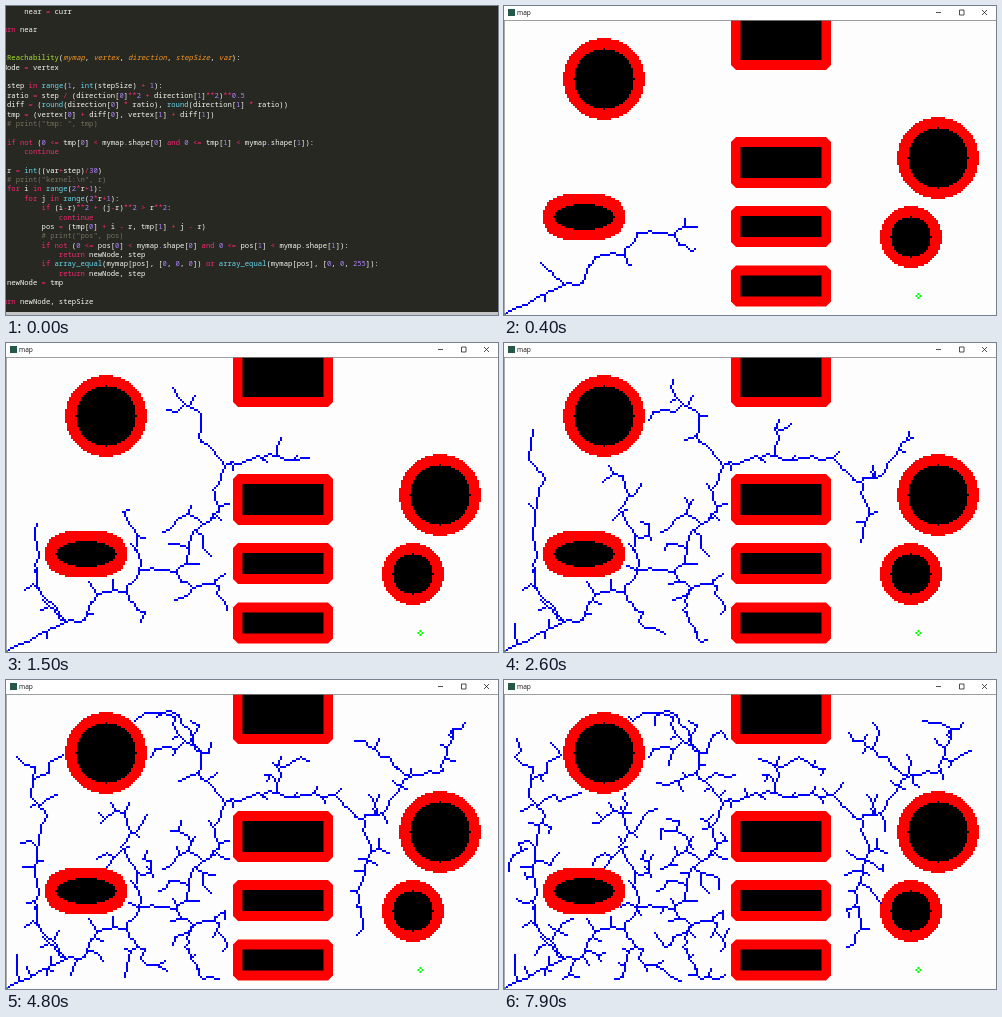
Recreate the animation shown at these times as an HTML page with a canvas. Size 492 px wide and 309 px high, loop 8 s.

```html
<!DOCTYPE html>
<html>
<head>
<meta charset="utf-8">
<style>
html, body { margin: 0; width: 100%; height: 100%; overflow: hidden; background: #272822; }
pre { position: absolute; left: -33.6px; top: .6px; margin: 0; color: #f8f8f2;
  font: 7.21px/9.355px "Noto Sans Mono", monospace; }
.comment { color: #75715e; }
.param { color: #fd971f; font-style: italic; }
.name { color: #a6e22e; }
.key { color: #f92672; }
.call { color: #66d9ef; }
.num { color: #ae81ff; }
#bar { position: absolute; left: 0; top: 306px; width: 492px; height: 3px; background: #c4c4c4; }
#win { position: absolute; left: 0; top: 0; width: 492px; height: 309px; transform-origin: 0 0; }
#win canvas { position: absolute; left: 0; top: 0; }
#win span { position: absolute; left: 13px; top: 2px; font: 6.6px/10px "Open sans", "Open Sans", sans-serif; color: #111; }
</style>
</head>
<body>
<pre id="code"></pre>
<div id="bar"></div>
<div id="win"><canvas id="map" width="492" height="309"></canvas><span>map</span></div>
<script>
const source = String.raw`            near = curr

    return near


def testReachability(mymap, vertex, direction, stepSize, var):
    newNode = vertex

    for step in range(1, int(stepSize) + 1):
        ratio = step / (direction[0]**2 + direction[1]**2)**0.5
        diff = (round(direction[0] * ratio), round(direction[1] * ratio))
        tmp = (vertex[0] + diff[0], vertex[1] + diff[1])
        # print("tmp: ", tmp)

        if not (0 <= tmp[0] < mymap.shape[0] and 0 <= tmp[1] < mymap.shape[1]):
            continue

        r = int((var+step)/30)
        # print("kernel:\n", r)
        for i in range(2*r+1):
            for j in range(2*r+1):
                if (i-r)**2 + (j-r)**2 > r**2:
                    continue
                pos = (tmp[0] + i - r, tmp[1] + j - r)
                # print("pos", pos)
                if not (0 <= pos[0] < mymap.shape[0] and 0 <= pos[1] < mymap.shape[1]):
                    return newNode, step
                if array_equal(mymap[pos], [0, 0, 0]) or array_equal(mymap[pos], [0, 0, 255]):
                    return newNode, step
        newNode = tmp

    return newNode, stepSize`;

const tokens = /(?<comment>#.*)|(?<param>(?<=^def .*[(, ])\w+(?=[,)]))|(?<name>testReachability)|(?<key>\b(?:def|for|in|if|not|and|or|return|continue)\b|[-<>=+*\/]+)|(?<call>\b(?:range|int|round|array_equal)\b)|(?<num>\b[\d.]+)/gm;
document.getElementById('code').innerHTML = source.replace(tokens, (text, ...rest) => {
  const kind = Object.entries(rest.at(-1)).find(([, match]) => match)[0];
  return `<span class="${kind}">${text.replace(/</g, '&lt;').replace(/>/g, '&gt;')}</span>`;
});

// Obstacles: blobs are [centre x, centre y, x radius, y radius] with radii in 2px cells
const blobs = [[100, 73, 15, 15], [434, 152, 15, 15], [407, 231, 10, 10], [80, 211, 15, 6.5]];
const rects = [[4, 64], [131, 182], [200, 241], [259.5, 300.5]];

// Main branches: [start tick, end tick, x, y, x, y, ...]; a tick is 100 ms
const branches = [
  [1, 5, 0, 308, 24, 295, 58, 278, 78, 276, 84, 258, 98, 247, 120, 248, 132, 225, 170, 226, 180, 220, 181, 204, 188, 185],
  [2, 3, 58, 278, 35, 256],
  [4, 5, 120, 248, 130, 265],
  [4, 5, 170, 226, 173, 238, 185, 243, 205, 240, 218, 230],
  [6, 12, 188, 185, 211, 168, 206, 145, 218, 122, 192, 92, 194, 72, 172, 53],
  [8, 24, 58, 278, 31, 246, 29, 180, 31, 155, 40, 135, 23, 110, 28, 85],
  [8, 22, 132, 225, 128, 185, 113, 165, 136, 140],
  [11, 22, 218, 122, 262, 110, 285, 116, 327, 113, 355, 138, 380, 128, 401, 95],
  [16, 34, 355, 138, 363, 165, 351, 218, 355, 240],
  [18, 25, 185, 243, 178, 265, 195, 298],
  [26, 46, 401, 95, 435, 90, 446, 47],
  [30, 44, 401, 95, 358, 60],
  [30, 46, 194, 72, 168, 31, 138, 31]
];

let seed = 11;
const random = () => (seed = seed * 16807 % 2147483647) / 2147483647;
const jitter = () => (random() - .5) * 5;

function trace([start, end, ...coords]) {
  const points = [];
  for (let i = 0; i < coords.length - 2; i += 2) {
    const [x, y, nx, ny] = coords.slice(i, i + 4);
    const steps = Math.ceil(Math.hypot(nx - x, ny - y) / 7);
    for (let s = 0; s < steps; s++) {
      const f = s / steps, wobble = s ? jitter : () => 0;
      points.push([x + (nx - x) * f + wobble(), y + (ny - y) * f + wobble()]);
    }
  }
  points.push(coords.slice(-2));
  return points.slice(1).map((to, i) =>
    ({ from: points[i], to, tick: Math.round(start + (end - start) * i / (points.length - 1)) }));
}

function isFree(x, y) {
  const open = x < 228 ? x > 4 && y > 30 && y < 302
    : x < 340 ? y > 76 && y < 122
    : x < 468 && y > 36 && y < 286 && (y < 108 || x < 384);
  return open
    && !blobs.some(([cx, cy, rx, ry]) => Math.hypot((x - cx) / (2 * rx + 13), (y - cy) / (2 * ry + 13)) < 1)
    && !rects.some(([top, bottom]) => x > 224 && x < 330 && y > top - 3 && y < bottom + 3);
}

// Twigs sprout from the nearest node towards random samples
function growTree() {
  const trunk = branches.flatMap(trace), tree = [];
  for (let tick = 0; tick < 80; tick++) {
    tree.push(...trunk.filter(s => s.tick === tick));
    let twigs = tick < 4 ? 0 : tick < 6 ? 2 : 4;
    for (let tries = 0; twigs && tries < 150; tries++) {
      const x = random() * 470, y = 30 + random() * 272;
      let from, best = 26;
      for (const { to } of tree) {
        const d = Math.hypot(x - to[0], y - to[1]);
        if (d < best) [from, best] = [to, d];
      }
      if (!from || best < 6) continue;
      const f = Math.min(1, (6 + random() * 7) / best);
      const to = [from[0] + (x - from[0]) * f, from[1] + (y - from[1]) * f];
      if (!isFree(...to)) continue;
      tree.push({ from, to, tick });
      twigs--;
    }
  }
  return tree;
}

const ctx = document.getElementById('map').getContext('2d');
const win = document.getElementById('win');
const tree = growTree();

function box(color, x, y, w, h) {
  ctx.fillStyle = color;
  ctx.fillRect(x, y, w, h);
}

function cellLine({ from, to }) {
  const [x, y, nx, ny] = [...from, ...to].map(v => Math.round(v / 2));
  const n = Math.max(Math.abs(nx - x), Math.abs(ny - y), 1);
  for (let i = 0; i <= n; i++)
    box('#00f', 2 * Math.round(x + (nx - x) * i / n), 2 * Math.round(y + (ny - y) * i / n), 2, 2);
}

function blob(color, cx, cy, rx, ry, power) {
  for (let j = -Math.floor(ry); j <= ry; j++)
    for (let i = -Math.floor(rx); i <= rx; i++)
      if (Math.abs(i / rx) ** power + Math.abs(j / ry) ** power <= 1)
        box(color, cx + 2 * i - 1, cy + 2 * j - 1, 2, 2);
}

function chamferedRect(top, bottom) {
  const l = 227, r = 327, c = 5;
  ctx.fillStyle = '#f00';
  ctx.beginPath();
  [[l + c, top], [r - c, top], [r, top + c], [r, bottom - c], [r - c, bottom], [l + c, bottom], [l, bottom - c], [l, top + c]]
    .forEach(p => ctx.lineTo(...p));
  ctx.fill();
  box('#000', l + 9.5, top + 10, 81, bottom - top - 20);
}

function titleBar() {
  box('#fff', 0, 0, 492, 14);
  box('#888', 0, 14, 492, .8);
  box('#888', 0, 14, .7, 295);
  box('#24584a', 4, 3, 7, 7);
  ctx.strokeStyle = '#222';
  ctx.lineWidth = .8;
  ctx.beginPath();
  ctx.moveTo(432, 6.5); ctx.lineTo(437, 6.5);
  ctx.rect(455.5, 4, 4.5, 5);
  ctx.moveTo(478, 4); ctx.lineTo(483, 9);
  ctx.moveTo(483, 4); ctx.lineTo(478, 9);
  ctx.stroke();
}

function drawMap(tick) {
  box('#fefdfe', 0, 0, 492, 309);
  for (const segment of tree) if (segment.tick <= tick) cellLine(segment);
  for (const [top, bottom] of rects) chamferedRect(top, bottom);
  for (const [cx, cy, rx, ry] of blobs) {
    const round = rx === ry;
    blob('#f00', cx, cy, rx + 5.3, ry + 5.3, round ? 2 : 2.6);
    blob('#000', cx, cy, rx, ry, 2);
  }
  for (const [dx, dy] of [[0, -2], [-2, 0], [2, 0], [0, 2]]) box('#0f0', 413.5 + dx, 289 + dy, 2, 2);
  box('#00a0a0', 0, 307, 2, 2);
  titleBar();
}

let shown = -1;
function frame() {
  const tick = Math.floor(performance.now() % 8000 / 100);
  if (tick !== shown) {
    shown = tick;
    const opening = tick === 3;
    win.style.opacity = tick < 3 ? 0 : opening ? .56 : 1;
    win.style.transform = opening ? 'translate(2.4px, .7px) scale(.977)' : 'none';
    drawMap(tick);
  }
  requestAnimationFrame(frame);
}
frame();
</script>
</body>
</html>
```
